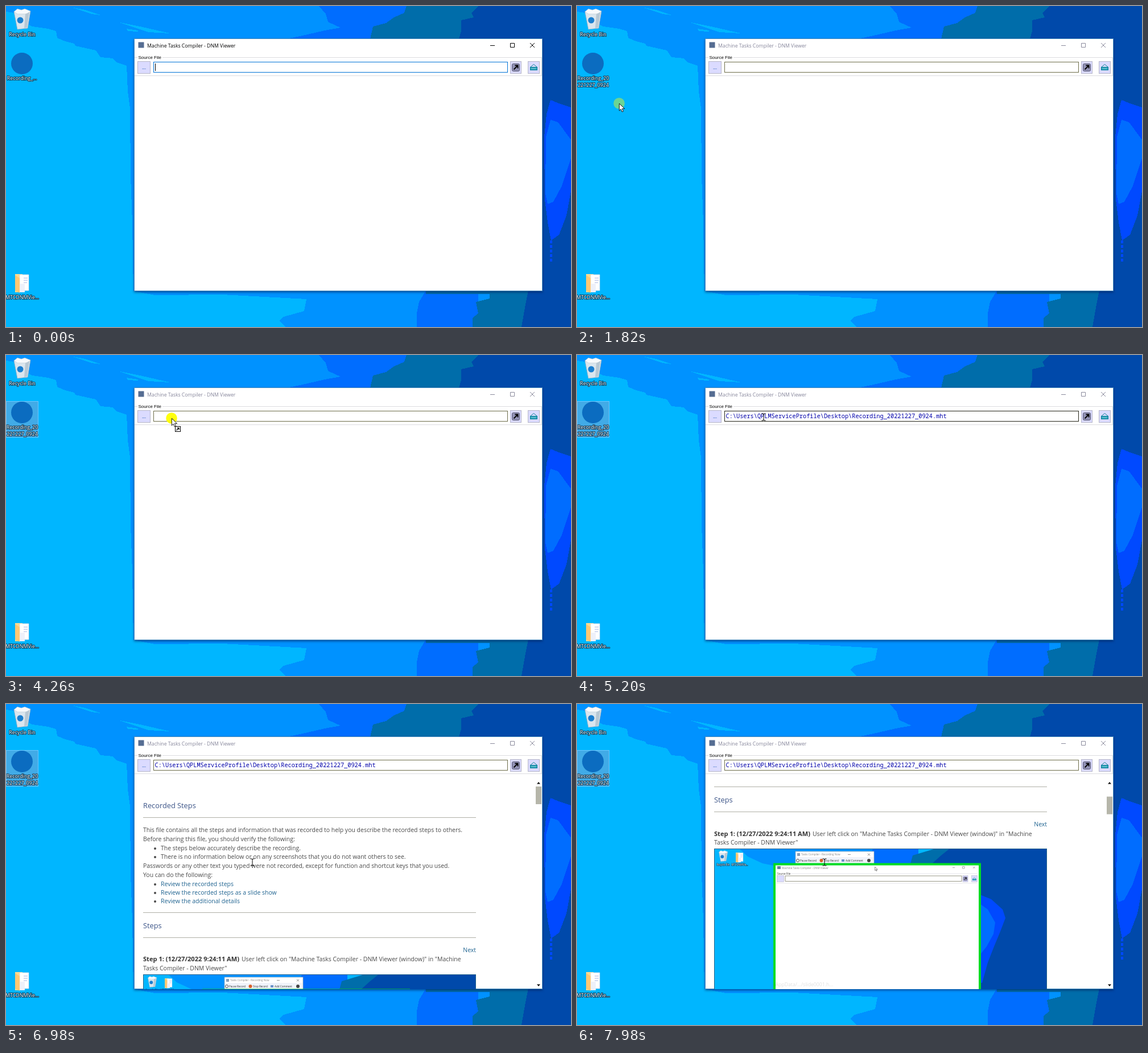
Write an HTML page that moves like this. It is 993x564 px and loops after 8 s.

```html
<!DOCTYPE html>
<html lang="en">
<head>
<meta charset="utf-8">
<title>Desktop demo</title>
<style>
html, body { margin: 0; width: 100%; height: 100%; overflow: hidden; background: #0092ff; }
svg { display: block; }
#stage { width: 100vw; height: 100vh; }
text { font: 8.7px "Open Sans", sans-serif; white-space: pre; }
.label text, text.label {
  fill: #fff; font-size: 8.9px; text-anchor: middle;
  stroke: #00182c; stroke-opacity: .75; stroke-width: 2px; stroke-linejoin: round; paint-order: stroke;
}
.body text { font-size: 10.47px; fill: #494949; }
.body .head { font-size: 12.8px; fill: #3d5588; }
.body .bold { font-size: 11.1px; font-weight: 700; fill: #333; }
.body .link { fill: #1f6390; }
.body .link.hot { fill: #1a62d8; text-decoration: underline; }
.body .shot text { font-size: 4.6px; fill: #333; }
.body .shot .label { fill: #fff; font-size: 4.4px; stroke-width: 1px; }
.body .shot .dim { fill: #888; }
.rule { stroke: #b0b0a6; }
.btn { fill: #dbdbff; stroke: #b6b6c8; }
.thin { stroke-width: .6; }
#path { font: 10.28px "Noto Sans Mono", monospace; fill: #0000aa; }
.small { font: 8px "Liberation Sans", sans-serif; }
</style>
</head>
<body>
<svg id="stage" viewBox="0 0 993 564" preserveAspectRatio="none">
  <defs>
    <clipPath id="view"><rect x="226" y="132" width="716" height="369"/></clipPath>
    <clipPath id="shotBox"><rect x="241" y="0" width="585" height="330"/></clipPath>
    <g id="bin">
      <path d="M14 10L43 9L38 39L20 41Z" fill="#dbe6ee" stroke="#9fb4c4" stroke-width=".8"/>
      <path d="M14 10L20 5L27 7L33 5L43 9L37 14L20 14Z" fill="#f7f9fb" stroke="#b6c6d2" stroke-width=".6"/>
      <path d="M34 14L41 11L37 38L32 39Z" fill="#b8c8d4"/>
      <circle cx="25" cy="25" r="5.5" fill="#1b7fd0"/>
    </g>
    <g id="folder">
      <path d="M16 471H29V503H16Z" fill="#ffdb92"/>
      <path d="M24 472H40V500H24Z" fill="#fff" stroke="#d0d8e8" stroke-width=".7"/>
      <path d="M31 478H38M31 482H38M31 486H37" stroke="#a4b4e4"/>
      <path d="M16 473L24 478V504L16 500Z" fill="#ffc873"/>
      <path d="M24 488H33V503H24Z" fill="#eef1fa"/>
    </g>
    <path id="arrow" d="M.3 .3V13L3.2 10.2L5.2 15L7.4 14L5.4 9.4H9.6Z" fill="#fff" stroke="#000" stroke-width=".9"/>
    <g id="openIcon">
      <rect x="889.5" y="101.5" width="13" height="13" rx="2" fill="#9292b6" stroke="#55556d"/>
      <path d="M892.5 111.5L899 105M894.5 104.5H899.5V109.5" fill="none" stroke="#000" stroke-width="1.8"/>
    </g>
    <g id="closeIcon" fill="none" stroke="#0a7f9a">
      <path d="M922 107L927.5 102.5L933 107"/>
      <rect x="921.5" y="107.5" width="12" height="5" fill="#2aa0b8"/>
      <path d="M923.5 110H931.5" stroke="#bfe6ee" stroke-dasharray="1.2 .6"/>
    </g>
  </defs>

  <!-- wallpaper -->
  <g shape-rendering="crispEdges">
    <rect width="993" height="564" fill="#0092ff"/>
    <path fill="#00b6ff" d="M0 10L14 12L22 24L46 36L74 40L88 44L90 56L104 62L120 66L122 70L158 78L166 90L188 92L194 99L212 105L214 150L218 180L219 300L222 380L224 501L262 508L380 507L528 515L524 536L488 546L480 553L492 564H0Z"/>
    <path fill="#00b6ff" d="M118 3L140 7L166 16L150 14ZM196 28L240 37L288 48L250 46ZM212 40L232 43V45L214 44Z"/>
    <path fill="#006dff" d="M550 0L562 14L566 28L588 38L560 43L530 50L498 57V70H830V0Z"/>
    <path fill="#006daa" d="M704 0L700 12L682 20L668 30L645 36L640 58H830V0Z"/>
    <path fill="#0049aa" d="M830 0L818 12L822 20L800 25V44L796 58H920V540L993 564V0Z"/>
    <path fill="#006dff" d="M738 500L726 520L722 540V564H830V500Z"/>
    <path fill="#006daa" d="M738 500V506H850V514L826 520L830 540L820 548V564H906L912 530L918 500Z"/>
    <path fill="#0049aa" d="M918 500L912 530L906 564H993V500Z"/>
    <path fill="#0049ff" d="M957 165L974 172L993 178V325L985 368L972 402L958 412L952 380L947 340L946 230L950 190Z"/>
    <path fill="#006dff" d="M957 200L970 204L993 235V268L976 318L962 344L952 348L948 330L949 230Z"/>
    <path stroke="#0049ff" stroke-width="4" stroke-dasharray="5 3" d="M958 412V450"/>
  </g>

  <!-- desktop icons -->
  <use href="#bin"/>
  <use href="#folder"/>
  <rect id="pick" x=".5" y="81.5" width="56" height="63" fill="#6da4d8" stroke="#92d0ff" stroke-opacity=".7"/>
  <circle cx="28" cy="101" r="19" fill="#0b6cc0"/>
  <g class="label">
    <text x="28.5" y="53.2">Recycle Bin</text>
    <text x="28.5" y="515.2">MTCDNMVie...</text>
    <text id="short" x="28" y="130.2">Recording_...</text>
    <g id="long"><text x="28.5" y="130.2">Recording_20</text><text x="28.5" y="142.2">221227_0924</text></g>
  </g>

  <!-- window -->
  <rect x="225" y="57" width="718" height="444" fill="#fff" style="filter:drop-shadow(0 2px 2px rgba(0,25,80,.6))"/>
  <rect x="225.5" y="57.5" width="717" height="443" fill="none" stroke="#0061a8" stroke-opacity=".7"/>
  <rect x="232.5" y="63.5" width="10" height="10" fill="#556d92"/>
  <g id="bar" fill="none">
    <text x="248" y="72.5" stroke="none" id="title">Machine Tasks Compiler - DNM Viewer</text>
    <path d="M851 69.5H859M886.5 65.5H893.5V72.5H886.5ZM921 65L929 73M929 65L921 73"/>
  </g>
  <path d="M226 90.5H231M275 90.5H941.5V122.5H226" fill="none" stroke="#dcdce0"/>
  <text class="small" x="232.5" y="93">Source File</text>
  <rect class="btn" x="231.5" y="97.5" width="22" height="21"/>
  <text x="242.5" y="110.5" text-anchor="middle" fill="#0049aa">...</text>
  <rect id="field" x="259.5" y="98.5" width="622" height="18" fill="#fff"/>
  <path id="caret" d="M262.5 101V114" stroke="#000"/>
  <text id="path" x="261.5" y="111">C:\Users\QPLMServiceProfile\Desktop\Recording_20221227_0924.mht</text>
  <rect class="btn" x="886.5" y="97.5" width="19" height="21"/>
  <rect class="btn" x="917.5" y="97.5" width="20" height="21"/>
  <use href="#openIcon"/>
  <use href="#closeIcon"/>

  <!-- report -->
  <g id="report" clip-path="url(#view)">
    <g id="page" class="body">
      <text class="head" x="241" y="183">Recorded Steps</text>
      <path class="rule" d="M241 199.5H826M241 366.5H826M241 410.5H826"/>
      <text x="241" y="225">This file contains all the steps and information that was recorded to help you describe the recorded steps to others.</text>
      <text x="241" y="241">Before sharing this file, you should verify the following:</text>
      <text x="272" y="257.5">The steps below accurately describe the recording.</text>
      <text x="272" y="272">There is no information below or on any screenshots that you do not want others to see.</text>
      <text x="241" y="288">Passwords or any other text you typed were not recorded, except for function and shortcut keys that you used.</text>
      <text x="241" y="304">You can do the following:</text>
      <text class="link" x="272" y="320.5">Review the recorded steps</text>
      <text class="link" id="slides" x="272" y="335">Review the recorded steps as a slide show</text>
      <text class="link" x="272" y="350">Review the additional details</text>
      <path d="M262 254h0M262 269h0M262 317h0M262 332h0M262 347h0" stroke="#494949" stroke-width="4" stroke-linecap="round"/>
      <text class="head" x="241" y="394">Steps</text>
      <text class="link" x="826" y="436" text-anchor="end">Next</text>
      <text class="bold" x="241" y="452.5">Step 1: (12/27/2022 9:24:11 AM)</text>
      <text x="414" y="452.5">User left click on "Machine Tasks Compiler - DNM Viewer (window)" in "Machine</text>
      <text x="241" y="467.8">Tasks Compiler - DNM Viewer"</text>
      <g class="shot" transform="translate(0 475)" clip-path="url(#shotBox)">
        <rect x="241" width="585" height="330" fill="#00b6ff"/>
        <path fill="#0092ff" d="M285 0H530V30H346L326 26L300 14Z"/>
        <path fill="#006dff" d="M520 0H600V30H510Z"/>
        <path fill="#006daa" d="M630 0L590 12L585 30H680V0Z"/>
        <path fill="#0049aa" d="M655 0L640 12L620 30H700V330H826V0Z"/>
        <path fill="#0049ff" d="M708 81L728 89L748 107L753 122L743 148L733 172L722 200L712 236H708Z"/>
        <path fill="#006dff" d="M708 97L722 107L735 130L732 150L720 172L708 187Z"/>
        <use href="#bin" transform="translate(242 1) scale(.53)"/>
        <use href="#folder" transform="translate(270.5 -245) scale(.535)"/>
        <text class="label" x="257" y="30">Recycle Bin</text>
        <text class="label" x="286" y="30">MTCDNMVie...</text>
        <rect x="384" y="5" width="138" height="22" fill="#fff" stroke="#92a4b6" stroke-width=".7"/>
        <rect x="387" y="8" width="5" height="5" fill="#8aa0b8"/>
        <text class="dim" x="394" y="12">Tasks Compiler - Recording Now</text>
        <path d="M476 10.5H481M511 8.5L515 12.5M515 8.5L511 12.5" stroke="#666" stroke-width=".7"/>
        <rect x="385" y="15" width="136" height="11" fill="#f0f3fa"/>
        <circle cx="388" cy="21" r="2.5" fill="none" stroke="#555"/>
        <circle cx="429.5" cy="21" r="3" fill="#d8602a"/>
        <rect x="465" y="19" width="5" height="4" fill="#6d92c8"/>
        <circle cx="513" cy="21" r="3" fill="#444"/>
        <text x="392" y="22.7">Pause Record</text>
        <text x="434" y="22.7">Stop Record</text>
        <text x="472" y="22.7">Add Comment</text>
        <rect x="347" y="27.5" width="361" height="330" fill="#fff" stroke="#00db24" stroke-width="4"/>
        <rect x="352" y="31" width="6" height="5" fill="#6d80a0"/>
        <text class="dim" x="360" y="35.5">Machine Tasks Compiler - DNM Viewer</text>
        <path d="M660 33.5H664M677.5 31.5H681V35H677.5ZM696 31.5L699.5 35M699.5 31.5L696 35" fill="none" stroke="#777" stroke-width=".6"/>
        <text x="352" y="46">Source File</text>
        <path d="M375 44H703M350 61H703" stroke="#dbdbe4" stroke-width=".7"/>
        <rect class="btn thin" x="351.5" y="47.5" width="12" height="11"/>
        <rect x="366" y="48" width="310" height="9.5" fill="#fff" stroke="#6d6d55" stroke-width=".7"/>
        <rect class="btn thin" x="678" y="47.5" width="9" height="11"/>
        <rect class="btn thin" x="693.5" y="47.5" width="10" height="11"/>
        <use href="#openIcon" transform="translate(234.5 -1) scale(.5)"/>
        <use href="#closeIcon" transform="translate(234.5 -.5) scale(.5)"/>
        <use href="#arrow" transform="translate(523.5 32) scale(.5)"/>
        <rect x="241.5" y=".5" width="584" height="340" fill="none" stroke="#20618a"/>
      </g>
    </g>
    <path id="up" d="M933 140.5H939L936 137Z"/>
    <path d="M933 492.5H939L936 496Z"/>
    <rect id="thumb" x="931" y="145" width="10" height="31" fill="#b6b6aa"/>
    <g id="status">
      <path id="tab" d="M226 485.5H460.5Q462.5 485.5 462.5 488V501H226Z" fill="#dbdbf4" stroke="#b6b6c8"/>
      <text x="229" y="496" fill="#555"><tspan id="head">C:/Users/QPLMServiceProfile</tspan><tspan id="tail">/AppData/.../slide0001.h...</tspan></text>
    </g>
  </g>

  <!-- pointer -->
  <g id="ghost" opacity=".5">
    <rect x=".5" y="81.5" width="56" height="63" fill="#6da4d8" fill-opacity=".4"/>
    <circle cx="28" cy="101" r="19" fill="#0b6cc0"/>
    <g class="label"><text x="28.5" y="130.2">Recording_20</text><text x="28.5" y="142.2">221227_0924</text></g>
  </g>
  <g id="pointer">
    <circle id="press" r="9.8" fill="#ffff00"/>
    <use id="plain" href="#arrow"/>
    <g id="link">
      <rect x="6.5" y="14.5" width="9" height="9" fill="#fff" stroke="#000"/>
      <path d="M8.5 21.5L12.5 17.5M9.5 17H13V20.5" fill="none" stroke="#000" stroke-width="1.2"/>
    </g>
    <path id="beam" d="M-3.5 -6H-1L0 -5L1 -6H3.5M0 -5V5M-3.5 6H-1L0 5L1 6H3.5" fill="none" stroke="#000"/>
    <path id="hand" d="M-1.5 1Q0 -1 1.5 1V6L8 7.5Q9 8 8.8 10L7.5 16.5H0L-4.5 10.5Q-4.5 8.5 -2.5 9.5L-1.5 10.5ZM3.8 6.5V9.5M6 7V9.8" fill="#fff" stroke="#000"/>
  </g>
</svg>
<script>
const LOOP = 8000;
const $ = id => document.getElementById(id);
const show = (id, on) => { $(id).style.display = on ? "" : "none"; };
const set = (id, name, value) => $(id).setAttribute(name, value);
const clamp = v => Math.max(0, Math.min(1, v));
const ease = (t, a, b) => { const k = clamp((t - a) / (b - a)); return k * k * (3 - 2 * k); };

// pointer keys: time, x, y
const keys = [
  [250, 212, 566], [560, 200, 440], [990, 236, 300], [1240, 236, 300],
  [1640, 74, 171], [1900, 74, 171], [2040, 60, 147], [2660, 31, 105],
  [3040, 31, 105], [3060, 30, 105], [3240, 30, 105], [3260, 31, 104],
  [3500, 31, 104], [3800, 105, 86], [4060, 205, 96], [4260, 291, 111],
  [4310, 291, 111], [4740, 328, 109], [5200, 328, 109], [5280, 339, 112],
  [6100, 339, 112], [6400, 424.5, 270.5], [6650, 424.5, 270.5], [6730, 433, 278],
  [7850, 433, 278], [7900, 435, 278]
];

function place(t) {
  let i = keys.findIndex(k => k[0] > t);
  if (i < 0) return keys[keys.length - 1].slice(1);
  if (i === 0) return keys[0].slice(1);
  const a = keys[i - 1], b = keys[i], k = ease(t, a[0], b[0]);
  return [a[1] + (b[1] - a[1]) * k, a[2] + (b[2] - a[2]) * k];
}

function pressLevel(t) {
  if (t >= 1740 && t < 1900) return t < 1800 ? .7 : .42;
  if (t >= 3460 && t < 5200) return .55 + .4 * ease(t, 3900, 4200);
  return 0;
}

function draw(t) {
  const [x, y] = place(t);
  const scroll = 111 * ease(t, 6980, 7270) + 110 * ease(t, 7850, 7965);
  const active = t < 1740, dragging = t >= 3500 && t < 5200;
  const hover = t < 7850 && scroll > 46;
  const overField = x > 259 && y > 98 && y < 117;

  // desktop and window
  show("short", active);
  show("long", !active);
  show("pick", t >= 2450);
  set("pick", "fill-opacity", t < 3460 ? .4 : .6);
  set("bar", "stroke", active ? "#000" : "#8a8a9c");
  set("title", "fill", active ? "#000" : "#85859a");
  show("caret", t < 300);
  set("field", "stroke", t < 300 ? "#0073d6" : overField && t >= 5200 ? "#242418" : "#6d6d49");
  show("path", t >= 5200);

  // report
  show("report", t >= 5450);
  set("page", "transform", `translate(0 ${-scroll})`);
  set("thumb", "y", 145 + scroll * .08);
  set("up", "fill", scroll > 0 ? "#000" : "#92929a");
  $("slides").classList.toggle("hot", hover);
  const fade = 1 - clamp((t - 7850) / 120);
  show("status", t >= 7160);
  set("tab", "opacity", fade);
  set("head", "fill-opacity", fade);
  set("tail", "fill-opacity", Math.max(.18, fade));

  // pointer
  show("pointer", t >= 250);
  set("pointer", "transform", `translate(${x} ${y})`);
  set("press", "opacity", pressLevel(t));
  show("plain", t < 5200);
  show("link", dragging && x > 226);
  show("beam", t >= 5200 && !hover);
  show("hand", hover);
  show("ghost", dragging && x < 226);
  set("ghost", "transform", `translate(${x - 31} ${y - 104})`);
}

const start = performance.now();
function tick() {
  draw((performance.now() - start) % LOOP);
  requestAnimationFrame(tick);
}
tick();
</script>
</body>
</html>
```
